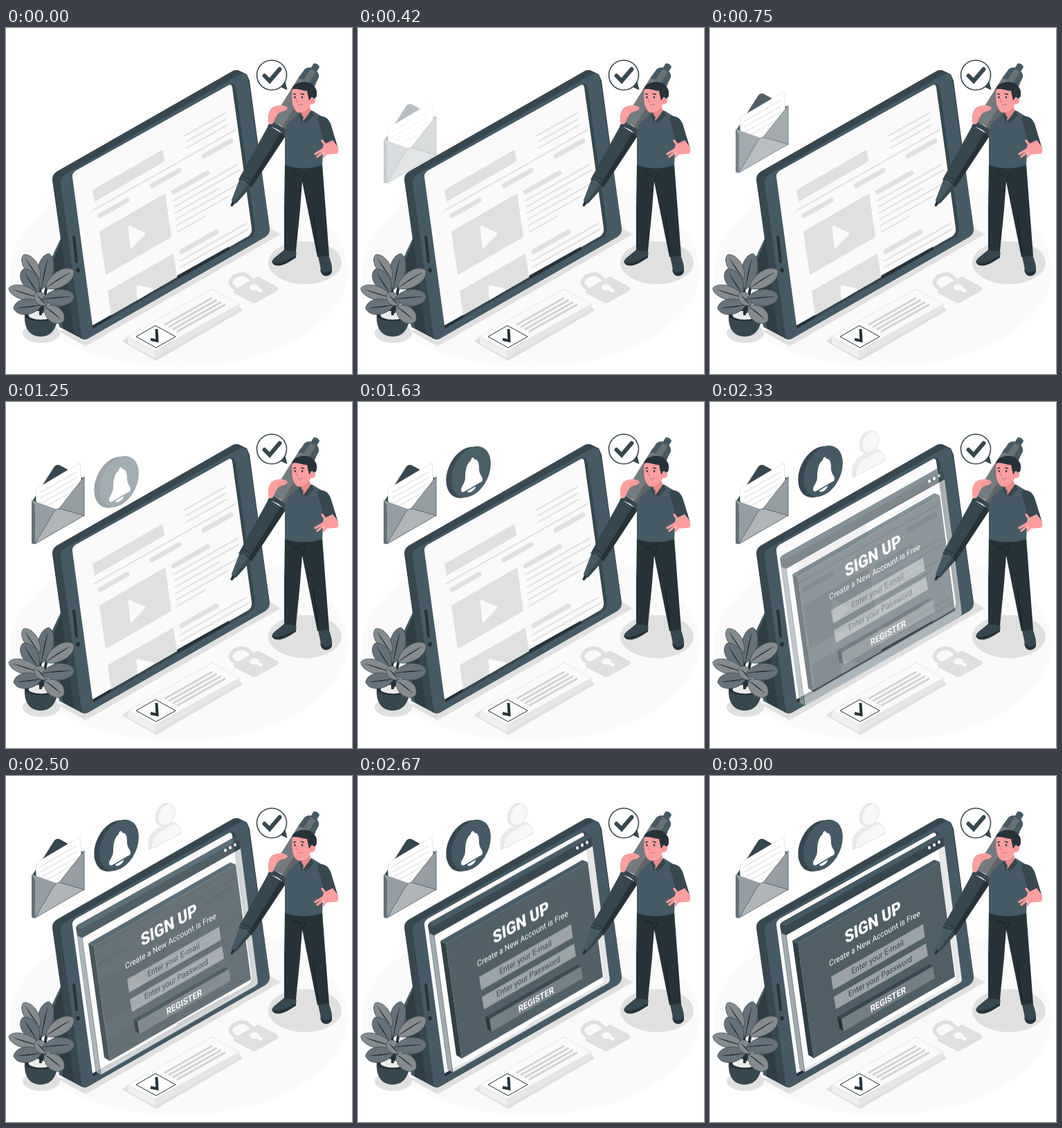
Write an HTML page that moves like this. It is 500 px wide and 500 px high and loops after 3040 ms.

```html
<!DOCTYPE html>
<html lang="en">
<head>
<meta charset="utf-8">
<title>Sign up</title>
<style>
  html, body { margin: 0; width: 100%; height: 100%; overflow: hidden; background: #fff; }
  svg { display: block; width: 100vw; height: 100vh; }
  text { font-family: Roboto, "Open Sans", sans-serif; text-anchor: middle; }
  .lines path { fill: none; stroke-linecap: butt; }
</style>
</head>
<body>
<svg viewBox="0 0 500 500">
  <!-- floor and shadows -->
  <ellipse cx="250" cy="350" rx="244" ry="140" fill="#fafafa"/>
  <g fill="#e0e0e0">
    <path d="M72 436L115 460L397 298L380 288L110 440Z"/>
    <ellipse cx="51" cy="441" rx="27" ry="14"/>
    <ellipse cx="432" cy="339" rx="53" ry="31"/>
  </g>

  <!-- tablet -->
  <path d="M80 302L64 336L77 432L106 447Z" fill="#455a64"/>
  <path d="M81 305L68 336L82 434L106 447Z" fill="#2f3d45"/>
  <path d="M67 220Q66 212 74 207L326 63Q332 59 338 62L348 67L352 76L381 291L118 449Q112 452 106 447L98 441Z" fill="#37474f"/>
  <path d="M79 225Q78 216 86 211L336 68Q348 62 350 75L381 289Q382 297 375 302L120 448Q111 453 109 443Z" fill="#455a64"/>
  <path d="M325 80Q331 80 332 87L360 290Q361 298 354 303L126 434L124 427L349 297Z" fill="#37474f"/>
  <path d="M96 216Q95 210 101 206L321 83Q326 80 327 86L355 289Q356 297 350 301L125 430Z" fill="#fafafa"/>
  <path d="M98 302L102 338" stroke="#263238" stroke-width="4" stroke-linecap="round"/>
  <circle cx="104" cy="350" r="3" fill="#263238"/>
  <path d="M125 430L152 414.500V419L126 434ZM247 358L322 316L323 320L248 363Z" fill="#263238"/>

  <!-- page on the screen -->
  <g fill="#e0e0e0">
    <path d="M125 234L226 176L229 193L128 251Z"/>
    <path d="M135 294L230 239L239 302L144 357Z"/>
    <path d="M147 380L242 326L247 360L152 415Z"/>
  </g>
  <g fill="#fafafa" stroke="#fafafa" stroke-width="3" stroke-linejoin="round">
    <path d="M178 287L200 297L181 317Z"/>
    <path d="M190 373L212 378L191 391Z"/>
  </g>
  <g id="page" class="lines" stroke="#e0e0e0"></g>

  <!-- padlock -->
  <path d="M336 380L327 373C317 362 341 350 350 359L358 366" fill="none" stroke="#e0e0e0" stroke-width="5.500"/>
  <path d="M330 378L360 361Q364 358 368 361L392 374Q396 377 392 380L363 396Q358 399 354 396L331 384Q327 381 330 378Z" fill="#e0e0e0"/>
  <path d="M362 376L370 381" stroke="#fafafa" stroke-width="5"/>
  <ellipse cx="359" cy="375" rx="7" ry="4.500" fill="#fafafa"/>

  <!-- checklist card -->
  <path d="M168 453L176 446L337 402L342 408L217 481Z" fill="#e0e0e0"/>
  <path d="M176 446L215 467V477L176 456Z" fill="#f0f0f0"/>
  <path d="M215 467L337 399V407L215 477Z" fill="#e6e6e6"/>
  <path d="M176 446L298 377L337 399L215 467Z" fill="#fafafa" stroke="#e0e0e0" stroke-width=".8"/>
  <path d="M188 446L216 430L245 446L217 462Z" fill="#fff" stroke="#263238"/>
  <path d="M209 450L218.500 452L217.500 435" fill="none" stroke="#263238" stroke-width="4"/>
  <g id="note" class="lines" stroke="#d2d2d2"></g>

  <!-- plant -->
  <path d="M27 415C26 432 33 446 50 446S75 431 74 415Z" fill="#37474f"/>
  <ellipse cx="50.500" cy="415" rx="23.500" ry="9" fill="#263238"/>
  <ellipse cx="50.500" cy="415" rx="18" ry="6.500" fill="#ebebeb"/>
  <path d="M50 415L49 365M52 412L60 365M50 400L36 365M51 405L70 380" fill="none" stroke="#263238" stroke-width="4"/>
  <g id="plant"></g>

  <!-- floating envelope -->
  <g id="gate"><g id="mail">
    <path d="M37 145L70 93Q74 89 79 92L113 111V163L42 204Z" fill="#37474f"/>
    <path d="M43 126L107 88L110 140L75 165L45 164Z" fill="#fff" stroke="#e0e0e0" stroke-width=".8"/>
    <g id="letter" class="lines" stroke="#d9d9d9"></g>
    <path d="M37 142L76 156L42 205Q37 206 37 202Z" fill="#979ea2"/>
    <path d="M113 108L76 155L113 165Z" fill="#979ea2" stroke="#455a64" stroke-width=".8"/>
    <path d="M42 205L69 159Q74 152 81 155L113 164Z" fill="#b0b5b8" stroke="#455a64" stroke-width=".8"/>
    <path d="M37 142L42 150V205Q37 206 37 202Z" fill="#66737a"/>
  </g></g>

  <!-- bell badge -->
  <g id="bell">
    <g fill="#37474f">
      <ellipse cx="156" cy="101" rx="26" ry="39" transform="rotate(25 156 101)"/>
      <ellipse cx="160" cy="100.500" rx="26" ry="39" transform="rotate(25 160 100.500)"/>
    </g>
    <ellipse cx="163.500" cy="100" rx="25.500" ry="39" transform="rotate(25 163.500 100)" fill="#455a64"/>
    <path d="M163 84C163 79 168 78 168 82C174 82 175 88 175 96C175 104 180 106 180 111Q180 114 177 115L153 129Q149 130 149 126C149 121 155 117 155 108C155 98 157 88 163 84Z" fill="#fff"/>
    <path d="M158 128L170 121C170 127 159 133 158 128Z" fill="#fff"/>
  </g>

  <!-- user badge -->
  <g id="user" stroke="#dedede" stroke-width=".8">
    <path d="M206 107V97C207 84 216 77 224 74L237 68C246 65 252 72 253 83Z" fill="#ebebeb"/>
    <path d="M210 105C210 91 217 82 226 78L240 70C249 67 253 74 253 83Z" fill="#f7f7f7"/>
    <ellipse cx="229" cy="56" rx="12" ry="17" transform="rotate(22 229 56)" fill="#ebebeb"/>
    <ellipse cx="232" cy="56" rx="11.500" ry="16.500" transform="rotate(22 232 56)" fill="#f7f7f7"/>
  </g>

  <!-- sign-up window -->
  <g id="form">
    <path d="M110 230L339 99L364 293Q365 297 360 300L137 428Z" fill="#fff" fill-opacity=".88" stroke="#455a64" stroke-opacity=".6" stroke-width=".8"/>
    <path d="M103 227L130 424L137 428L110 230Z" fill="#a3aaae" stroke="#455a64" stroke-width=".5"/>
    <path d="M101 216Q101 213 104 211L329 85L337 88L339 101L110 230L103 227Z" fill="#37474f"/>
    <path d="M101 214L329 85L337 88L109 217Z" fill="#455a64"/>
    <g fill="#fff">
      <ellipse cx="317" cy="103.500" rx="2" ry="2.600"/>
      <ellipse cx="324" cy="99.500" rx="2" ry="2.600"/>
      <ellipse cx="331" cy="95.500" rx="2" ry="2.600"/>
    </g>
    <path d="M119 238L324 121L332 124L127 242Z" fill="#455a64"/>
    <path d="M119 238L127 242L150 408L142 403Z" fill="#2f3d44"/>
    <path d="M127 242L332 124L354 290L150 408Z" fill="#37474f" fill-opacity=".87"/>
    <g fill="#9ba3a7">
      <path d="M175 290L308 214L310.500 233L178 309Z"/>
      <path d="M179 319L312 242L315 260L182 337Z"/>
    </g>
    <path d="M184 348L317 272L322 275L190 352Z" fill="#37474f"/>
    <path d="M184 348L190 351L193 369L187 365Z" fill="#263238"/>
    <path d="M190 351L322 275L325 292L193 369Z" fill="#747f85"/>
    <g id="words"></g>
  </g>

  <!-- pen, laid along its own axis from the tip -->
  <g transform="translate(325.500 257.500) rotate(-58.800)">
    <path d="M0 -1.500L10 -3V3L0 1.500Z" fill="#263238"/>
    <path d="M7 -4L40 -10V10L7 4Z" fill="#455a64"/>
    <path d="M7 1L40 4V10L7 4Z" fill="#37474f"/>
    <path d="M39 -11Q43 0 39 11L128 14.500V-14.500Z" fill="#37474f"/>
    <path d="M41 5L128 6V14.500L39 11Z" fill="#263238"/>
    <path d="M39 -11Q43 0 39 11M45 -11Q49 0 45 11" fill="none" stroke="#263238"/>
    <path d="M126 -15Q133 0 126 15L136 15V-15Z" fill="#37474f"/>
    <path d="M134 -14.500Q139 0 134 14.500L214 13V-13Z" fill="#737b7f"/>
    <path d="M136 4L214 4V13L134 14.500Z" fill="#5e666a"/>
    <path d="M208 -13Q214 0 208 13L224 12Q231 10 232 0Q231 -10 224 -12Z" fill="#455a64"/>
    <path d="M211 -5L229 -5Q231 0 229 4L211 4Z" fill="#667176"/>
    <path d="M229 -5H238Q242 0 238 5H229Z" fill="#455a64"/>
  </g>

  <!-- check bubble -->
  <path d="M397 85L406 89L403 78Z" fill="#37474f" stroke="#37474f"/>
  <circle cx="384" cy="68" r="21.500" fill="#fff" stroke="#37474f" stroke-width="1.600"/>
  <path d="M373.500 69L381 76.500L395.500 59.500" fill="none" stroke="#37474f" stroke-width="6" stroke-linecap="round"/>

  <!-- man -->
  <path d="M404 319L419 322C421 329 418 333 411 336C404 342 393 345 386 341Q382 337 388 332Z" fill="#37474f"/>
  <path d="M384 337C392 342 402 337 419 329L419 332C409 338 397 347 387 342Z" fill="#263238"/>
  <path d="M451 328L466 327C469 336 473 347 470 354C466 360 457 359 455 352C455 344 452 339 451 328Z" fill="#37474f"/>
  <path d="M454 348Q461 358 471 349Q472 357 463 358.500Q455 358 454 348Z" fill="#263238"/>
  <path d="M403 196H457L461 250L467 329L450 331L428 222L425 262L419 323L402 321L402 260Z" fill="#263238"/>
  <path d="M414 209L427 214M428 222L433 210M444 270L451 326" fill="none" stroke="#151d21"/>
  <path d="M403 152Q404 142 409 136L424 122L442 119L455 127Q463 134 460 153L457 198Q431 207 403 198Z" fill="#455a64"/>
  <path d="M451 127Q464 126 469 138L480 174L459 168Q456 146 451 137Z" fill="#37474f"/>
  <path d="M472 162L479 171C482 179 480 183 474 182L462 183L456 177L460 168Z" fill="#fe9f9f"/>
  <path d="M463 171L457 163M461 174L447 182M460 178L450 186M463 180L459 186" stroke="#fe9f9f" stroke-width="3.500" stroke-linecap="round"/>
  <path d="M426 119L439 114L441 124L430 134Z" fill="#ec8888"/>
  <path d="M423 123L430 129L427 138ZM430 134L441 119L445 126L433 138Z" fill="#37474f"/>
  <path d="M414 88C412 102 414 119 422 122C430 124 438 118 440 110C448 112 450 101 443 99L439 84Z" fill="#fe9f9f"/>
  <path d="M413 89C414 82 421 79 428 78C440 76 451 86 449 96C449 102 445 103 443 100C440 99 440 104 438 105L435 91C428 91 420 86 413 89Z" fill="#263238"/>
  <g fill="#263238">
    <ellipse cx="417.500" cy="100" rx="1.200" ry="1.700"/>
    <ellipse cx="428" cy="100" rx="1.200" ry="1.700"/>
  </g>
  <path d="M415 96L419 95M426 95L431 96" stroke="#263238" stroke-width="1.300"/>
  <path d="M421 101L419 106L423 106M443 104L440 108" fill="none" stroke="#df7777"/>
  <path d="M422 111Q425 114 429 110Z" fill="#fff" stroke="#a95050" stroke-width=".7"/>
  <path d="M380 139C377 130 379 118 386 114C394 110 404 111 407 116C406 120 398 120 394 123C390 127 388 134 385 139Z" fill="#fe9f9f"/>
  <path d="M390 118L404 115M391 121L399 119" stroke="#ec8888" stroke-width=".8"/>
</svg>
<script>
const LOOP = 3040, RISE = 1000, SLOPE = -0.565;
const byId = id => document.getElementById(id);

// Slanted strokes: start x, start y, end x, width
function strokes(id, list, cap = 'butt') {
  byId(id).insertAdjacentHTML('beforeend', list.map(([x, y, end, w]) =>
    `<path d="M${x} ${y}L${end} ${y + (end - x) * SLOPE}" stroke-width="${w}" style="stroke-linecap:${cap}"/>`).join(''));
}
const rows = (n, fn) => Array.from({ length: n }, (_, i) => fn(i));

strokes('page', [[125, 264, 333, 2]]);
strokes('page', rows(3, i => [258 + i, 156 + i * 9, 317 + i * 1.5, 2]));
strokes('page', rows(6, i => [241 + i * 1.2, 250 + i * 9, [336, 337, 309, 339, 321, 288][i], 2]));
strokes('page', rows(2, i => [251 + i, 337 + i * 9, 348 + i * 2, 2]));
strokes('page', [[136, 271, 175, 7], [211, 228, 250, 7], [286, 185, 325, 7],
                 [242, 237, 291, 7], [254, 323, 304, 7]], 'round');
strokes('note', rows(4, i => [229 + i * 6, 429 + i * 3.3, 298 + i * 6.3, 3]));
strokes('letter', rows(4, i => [49 + i * 0.5, 131 + i * 8, 102 + i * 0.5, 1]));

// Leaves: base, tip, width, fill
function leaf([x, y, tx, ty, w, fill]) {
  const len = Math.hypot(tx - x, ty - y);
  const turn = Math.atan2(ty - y, tx - x) * 180 / Math.PI;
  return `<g transform="translate(${x} ${y}) rotate(${turn})" stroke="#37474f" stroke-width=".7">
    <path d="M0 0C${len * .25} ${-w} ${len * .9} ${-w} ${len} 0C${len * .9} ${w} ${len * .25} ${w} 0 0Z" fill="${fill}"/>
    <path d="M0 0Q${len / 2} -2 ${len * .85} 0"/></g>`;
}
const light = '#858b8e', dark = '#66717a';
byId('plant').innerHTML = [
  [51, 378, 62, 326, 15, dark], [49, 363, 25, 328, 13, light], [47, 384, 24, 349, 15, dark],
  [50, 390, 4, 376, 13, light], [57, 376, 98, 350, 15, light], [52, 400, 11, 405, 15, dark],
  [59, 401, 43, 383, 11, light], [52, 392, 99, 388, 16, dark], [55, 402, 83, 424, 15, light]
].map(leaf).join('');

// Words on the isometric face: x, baseline, size, weight, fill, text
byId('words').innerHTML = [
  [236.5, 219.5, 24.2, 900, '#fff', 'SIGN UP'],
  [238.5, 238.5, 11.6, 400, '#fff', 'Create a New Account is Free'],
  [242.5, 265.5, 11.6, 400, '#37474f', 'Enter your E-mail'],
  [246.5, 293.5, 11.6, 400, '#37474f', 'Enter your Password'],
  [258, 327, 12.8, 700, '#fff', 'REGISTER']
].map(([x, y, size, weight, fill, text]) =>
  `<text transform="matrix(.866 ${SLOPE * .866} .135 1 ${x} ${y})" font-size="${size}" font-weight="${weight}" fill="${fill}">${text}</text>`).join('');

const timing = { duration: LOOP, iterations: Infinity };
const low = { opacity: 0, transform: 'translateY(30px)' };
const home = { opacity: 1, transform: 'translateY(0px)' };

for (const [id, start] of [['mail', 0], ['bell', 750], ['user', 1500], ['form', 1750]]) {
  byId(id).animate([
    { ...low, offset: 0 },
    { ...low, offset: start / LOOP, easing: 'ease-in-out' },
    { ...home, offset: (start + RISE) / LOOP },
    { ...home, offset: 1 }
  ], timing);
}
// The envelope stays hidden for the opening pause
byId('gate').animate([
  { opacity: 0, offset: 0, easing: 'step-end' },
  { opacity: 1, offset: 210 / LOOP },
  { opacity: 1, offset: 1 }
], timing);
</script>
</body>
</html>
```
